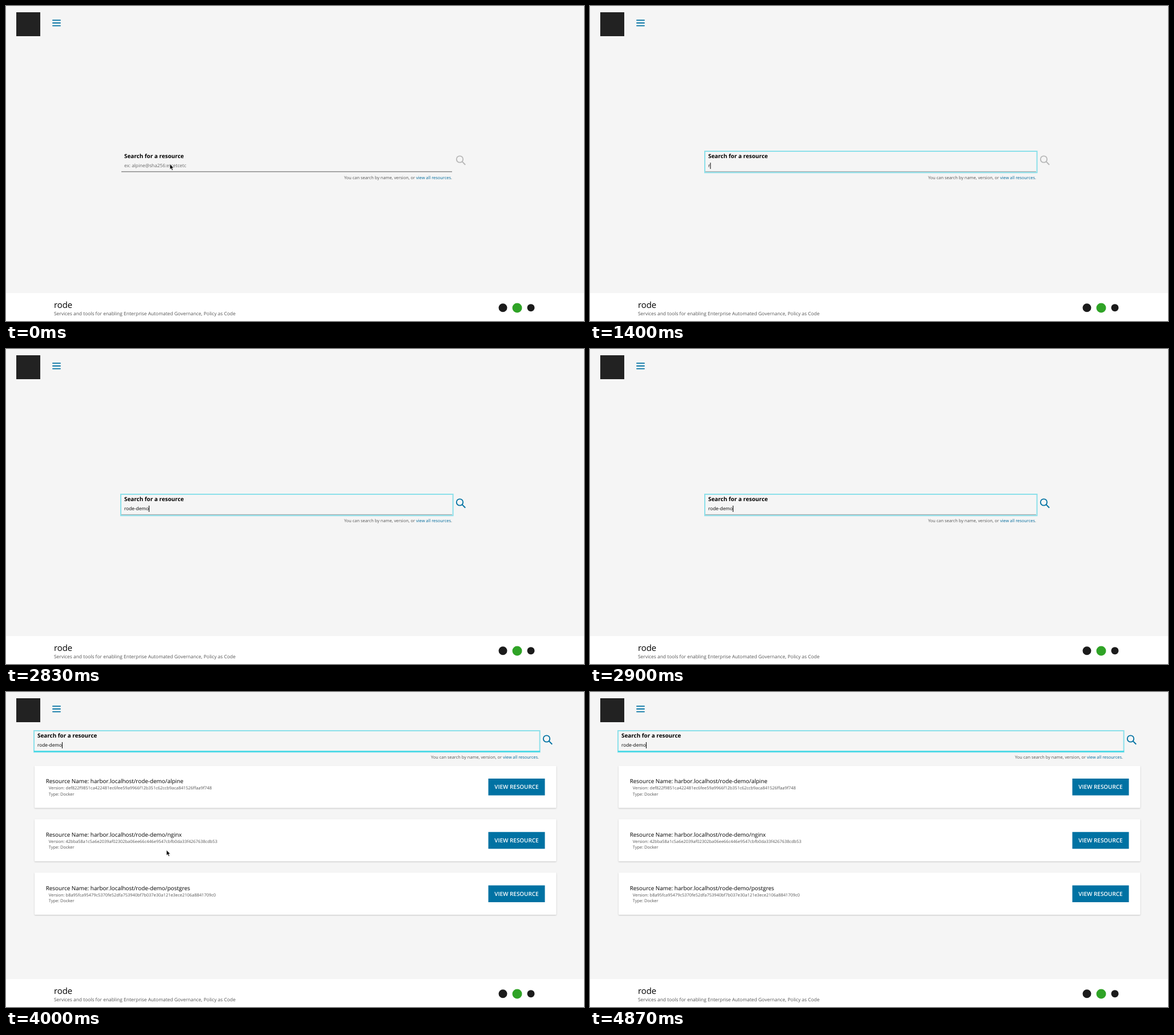
These frames come from a looping animation (1012x553 px, 4.91 s). An HTML page:

```html
<!DOCTYPE html>
<html lang="en">
<head>
<meta charset="utf-8">
<title>Resource search</title>
<style>
  html, body { margin: 0; height: 100%; overflow: hidden; background: #f5f5f5; }
  svg { display: block; width: 100vw; height: 100vh; font-family: "Open Sans", sans-serif; text-rendering: geometricPrecision; }
  .label { font-size: 9.92px; font-weight: 700; }
  .input { font-size: 8.27px; }
  .body { font-size: 9.92px; }
  .small { font-size: 7.44px; fill: #555; }
  .button { font-size: 9.92px; font-weight: 600; fill: #fff; text-anchor: middle; }
  .card { fill: #fff; filter: drop-shadow(0 1px 1px rgba(0, 0, 0, .2)); }
</style>
</head>
<body>
<svg viewBox="0 0 1012 553" preserveAspectRatio="none">
  <rect width="1012" height="553" fill="#f5f5f5"/>
  <rect x="18" y="11" width="42" height="42" fill="#222"/>
  <path d="M82 24.9h13M82 29.7h13M82 34.6h13" stroke="#0072a3" stroke-width="1.9" stroke-linecap="round"/>

  <g id="field">
    <path id="underline" stroke-width="1.1"/>
    <rect id="outline" y="255" height="37.4" fill="none" stroke="#8ce0ea" stroke-width="2"/>
    <path id="accent" stroke="#35d6e4" stroke-width="1.9"/>
    <g id="left">
      <text class="label" x="207" y="267">Search for a resource</text>
      <text class="input" id="query" x="207" y="283.3"></text>
      <rect id="caret" y="275" width="1" height="11"/>
    </g>
    <g id="right">
      <text class="small" x="781" y="304.2" text-anchor="end">You can search by name, version, or <tspan fill="#006a9b">view all resources</tspan>.</text>
      <g id="lens" fill="none" stroke-width="1.8">
        <circle cx="794.5" cy="269" r="5.7"/>
        <path d="M798.6 273.1l5.6 5.7" stroke-width="2"/>
      </g>
    </g>
  </g>

  <g id="results"></g>

  <rect y="504" width="1012" height="49" fill="#fff"/>
  <text x="84" y="529.5" font-size="14.88">rode</text>
  <text x="84" y="543" font-size="8.42" fill="#555">Services and tools for enabling Enterprise Automated Governance, Policy as Code</text>
  <circle cx="870" cy="529.7" r="7.5" fill="#1b1b1b"/>
  <circle cx="895" cy="530" r="8.5" fill="#2fa326"/>
  <circle cx="919" cy="529.7" r="6.5" fill="#1b1b1b"/>

  <path id="arrow" d="M0 0v9.4l2.1-2 1.6 3.5 1.7-.8-1.6-3.3h2.9z" stroke="#fff" stroke-width=".7"/>
  <path id="beam" d="M285.7 274h3.2M287.3 274v9.6M285.7 283.6h3.2" stroke="#222" stroke-width=".9"/>
</svg>
<script>
const $ = id => document.getElementById(id);
const LOOP = 4910, FOCUS = 730, FIRST_KEY = 1400, SUBMIT = 2930;
const query = "rode-demo";
const keyTimes = [FIRST_KEY, 1530, 1670, 1930, 2000, 2170, 2400, 2500, 2670];
const resources = [
  ["alpine", "def822f9851ca422481ec6fee59a9966f12b351c62ccb9aca841526ffaa9f748"],
  ["nginx", "42bba58a1c5a6e2039af02302ba06ee66c446e9547cbfb0da33f4267638cdb53"],
  ["postgres", "b8a95fca95479c5370fe52dfa753940bf7b037e30a121e3ece2106a8841709c0"]
];

$("results").innerHTML = resources.map(([name, version], i) => `
  <g transform="translate(0 ${i * 93.75})">
    <rect class="card" x="50" y="129.5" width="913.5" height="74" rx="1"/>
    <text class="body" x="69.7" y="160">Resource Name: harbor.localhost/rode-demo/${name}</text>
    <text class="small" x="74.7" y="171">Version: ${version}</text>
    <text class="small" x="74.7" y="181.6">Type: Docker</text>
    <rect x="844.5" y="152" width="99" height="29.5" fill="#0072a3"/>
    <text class="button" x="894" y="170.4">VIEW RESOURCE</text>
  </g>`).join("");

const show = (id, on) => $(id).style.display = on ? "" : "none";
const move = (id, x, y) => $(id).setAttribute("transform", `translate(${x} ${y})`);
const mix = (a, b, k) => a.map((v, i) => Math.round(v + (b[i] - v) * k));

function render(t) {
  const typed = keyTimes.filter(k => k <= t).length;
  const focused = t >= FOCUS, submitted = t >= SUBMIT;
  const grow = submitted ? 152 : 0;

  move("field", 0, submitted ? -187 : 0);
  move("left", -grow, 0);
  move("right", grow, 0);
  $("underline").setAttribute("d", `M${202 - grow} 290.9H${781 + grow}`);
  $("underline").setAttribute("stroke", focused ? "#999" : "#777");
  $("accent").setAttribute("d", `M${201 - grow} 291.3H${783 + grow}`);
  $("outline").setAttribute("x", 201 - grow);
  $("outline").setAttribute("width", 581.6 + 2 * grow);
  show("outline", focused);
  show("underline", !submitted);
  show("accent", submitted);
  show("results", submitted);

  $("query").textContent = typed ? query.slice(0, typed) : "ex: alpine@sha256:etcetcetc";
  $("query").setAttribute("fill", typed ? "#000" : "#666");

  // The caret blinks every half second, restarting at each key
  const lastInput = typed ? keyTimes[typed - 1] : FOCUS;
  show("caret", focused && Math.floor((t - lastInput) / 500) % 2 === 0);
  $("caret").setAttribute("x", 207 + (typed ? $("query").getComputedTextLength() : 0));

  const active = Math.min(1, Math.max(0, (t - FIRST_KEY) / 300));
  $("lens").setAttribute("stroke", `rgb(${mix([184, 184, 184], [0, 114, 163], active)})`);

  const returned = t >= 4000 && t < 4470;
  show("arrow", t < 30 || returned);
  move("arrow", returned ? 281 : 287, 277.5);
  show("beam", t >= 30 && t < FIRST_KEY);
}

function tick() {
  render(performance.now() % LOOP);
  requestAnimationFrame(tick);
}
tick();
</script>
</body>
</html>
```
